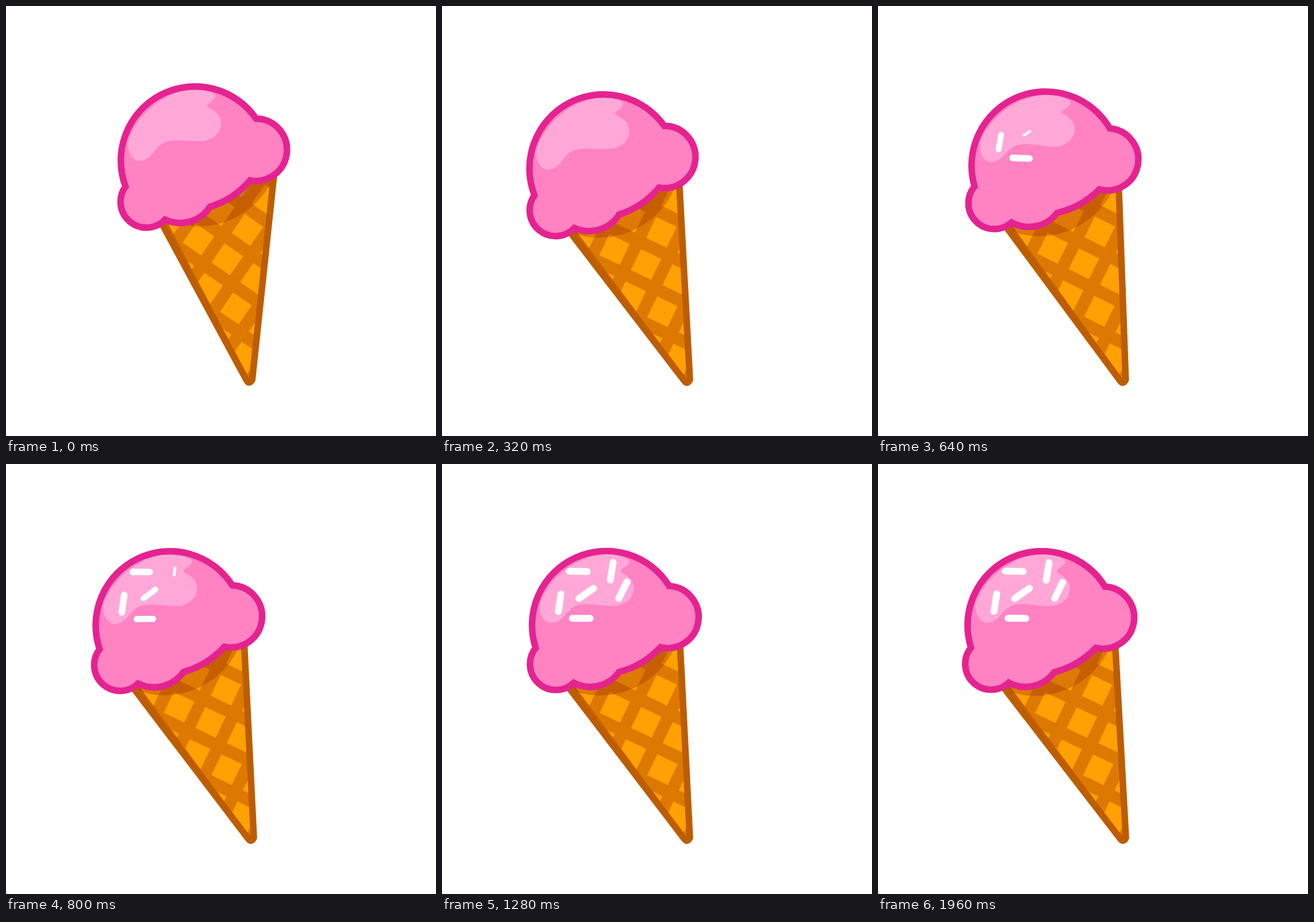
Recreate the animation shown at these times as an HTML page. Size 748 by 748 pixels, loop 2 s.

```html
<!DOCTYPE html>
<html lang="en">
<head>
<meta charset="utf-8">
<title>Ice cream</title>
<style>
  html, body { margin: 0; width: 100%; height: 100%; overflow: hidden; background: #fff; }
  svg { display: block; width: 100vw; height: 100vh; }
</style>
</head>
<body>
<svg viewBox="0 0 748 748">
  <defs>
    <path id="coneShape" d="M208 374.2L421.3 651.7Q427 659.5 431.2 650L411 275Z"/>
    <path id="scoopShape" d="M162.2 319.2A129 129 0 0 1 395.2 213A54.1 54.1 0 1 1 379.3 319.6
      A150 150 0 0 1 307 362A62 62 0 0 1 228 380.3A45 45 0 0 1 162.2 319.2Z"/>
    <clipPath id="coneClip"><use href="#coneShape"/></clipPath>
    <pattern id="waffle" width="60.8" height="62" patternUnits="userSpaceOnUse"
      patternTransform="translate(355 449.7) rotate(25.4) translate(-30.4 -31)">
      <rect width="60.8" height="62" fill="#dd7900"/>
      <rect x="10.7" y="10.8" width="39.4" height="40.4" fill="#ffa003"/>
    </pattern>
  </defs>
  <g id="cone">
    <use href="#coneShape" fill="url(#waffle)"/>
    <g clip-path="url(#coneClip)">
      <path d="M224 388L421 652" stroke="#c66500" stroke-width="11"/>
      <circle cx="274" cy="261" r="142" fill="#9c2a00" fill-opacity=".33"/>
    </g>
    <use href="#coneShape" fill="none" stroke="#bd5d00" stroke-width="11.4" stroke-linejoin="round"/>
    <g id="scoop">
      <use href="#scoopShape" fill="#ff82c3"/>
      <path fill="#ffa8d8" d="M170 246C174 217 221 160 284 157C302 157 318 161 325 167
        C328 171 325 175 319 179C313 183 309 186 313 189C323 195 334 202 334 216
        C334 234 318 247 298 247C276 247 252 240 234 246C216 252 211 276 190 276
        C178 276 169 262 170 246Z"/>
      <use href="#scoopShape" fill="none" stroke="#e52390" stroke-width="11.4" stroke-linejoin="miter"/>
      <g id="sprinkles" stroke="#fff" stroke-width="12" stroke-linecap="round"></g>
    </g>
  </g>
</svg>
<script>
const LOOP = 2000, STEP = 40;
const byId = id => document.getElementById(id);
const cone = byId('cone'), scoop = byId('scoop');

// x, y, angle, in order of appearance
const sprinkles = [
  [204.5, 241, 99], [242, 268.3, 0.5], [251, 225, 145],
  [237.5, 186.5, 1.5], [295.5, 186.7, 99], [314.7, 219.7, 116.5]
].map(([x, y, angle]) => {
  const el = document.createElementNS('http://www.w3.org/2000/svg', 'path');
  el.setAttribute('d', 'M-15.5 0H15.5');
  byId('sprinkles').append(el);
  return { el, x, y, angle };
});

// age in ms, scale
const POP = [[0, 0], [10, .05], [90, .4], [170, .95], [195, 1], [250, .84],
  [330, .91], [410, .97], [490, 1.02], [570, 1]];

function popScale(age) {
  if (age <= 0) return 0;
  const i = POP.findIndex(p => p[0] > age);
  if (i < 0) return 1;
  const [t0, s0] = POP[i - 1], [t1, s1] = POP[i];
  return s0 + (s1 - s0) * (age - t0) / (t1 - t0);
}

// Swings from an angle to zero, then rings past it and dies out.
function swing(t, from, begin, end, amp) {
  if (t <= begin) return from;
  if (t < end) return from * (1 - Math.pow((t - begin) / (end - begin), 1.25));
  const s = (t - end) / 1000;
  return -Math.sign(from) * amp * Math.sin(4 * Math.PI * s) * Math.exp(-2 * s);
}

function draw(t) {
  cone.setAttribute('transform', `rotate(${swing(t, 9.15, 0, 320, 2.5)} 426.5 632)`);
  scoop.setAttribute('transform', `rotate(${swing(t, -12.1, 80, 400, 3.4)} 320 346)`);
  sprinkles.forEach(({ el, x, y, angle }, i) => {
    const s = popScale(t - 390 - 80 * i);
    el.setAttribute('visibility', s ? 'visible' : 'hidden');
    el.setAttribute('transform', `translate(${x} ${y}) rotate(${angle}) scale(${s})`);
  });
}

const start = performance.now();
function tick() {
  const t = (performance.now() - start) % LOOP;
  draw(Math.floor(t / STEP) * STEP);
  requestAnimationFrame(tick);
}
tick();
</script>
</body>
</html>
```
